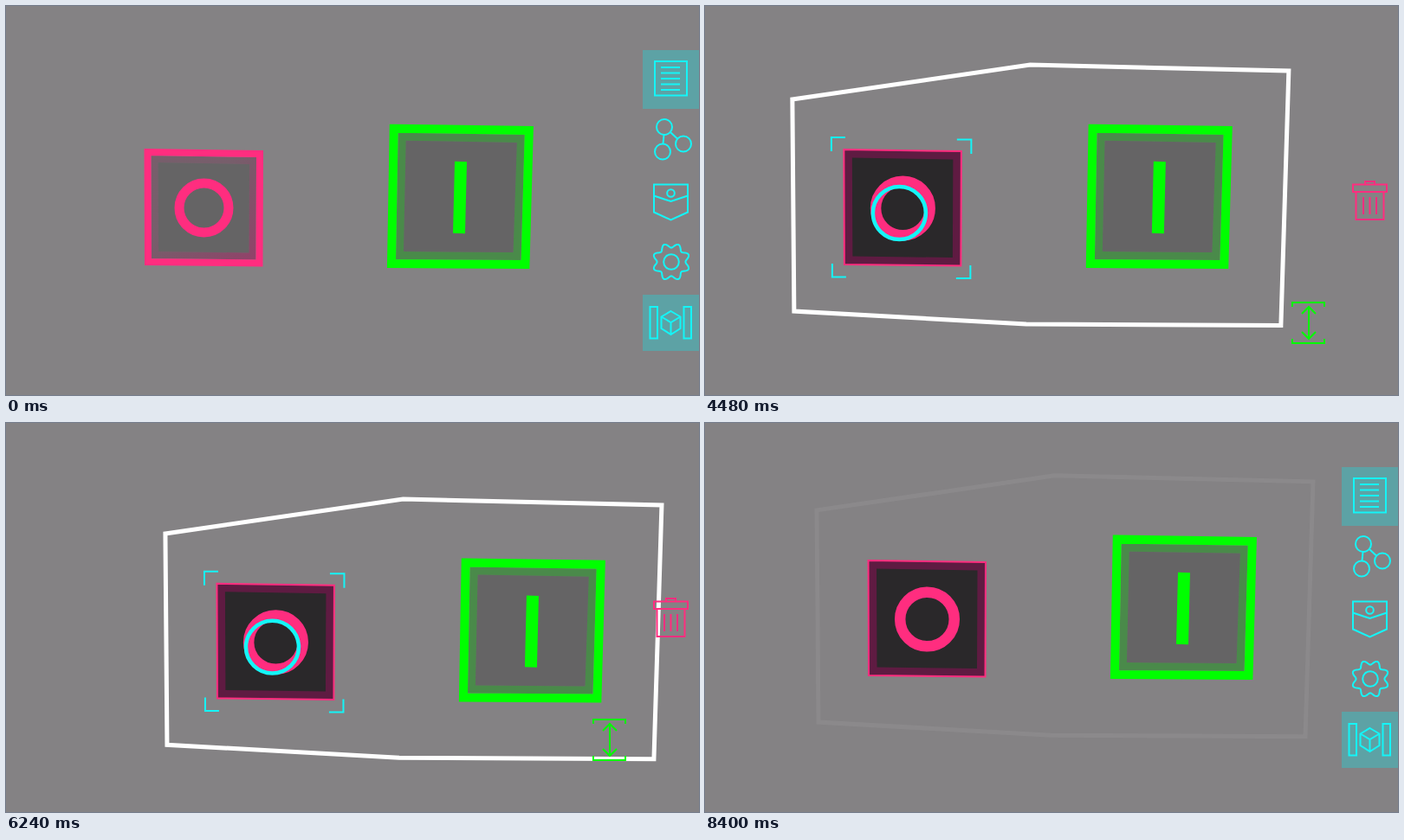
These frames come from a looping animation (800 px wide and 450 px high, 8.56 s). An HTML page:

```html
<!DOCTYPE html>
<html lang="en">
<head>
<meta charset="utf-8">
<title>Lasso and drag</title>
<style>
  html, body { margin: 0; width: 100%; height: 100%; overflow: hidden; background: #848284; }
  svg { display: block; width: 800px; height: 450px; }
  path, circle { fill: none; }
  .line { stroke-width: 2; }
  .cyan { stroke: #14f5f7; }
  .pink { stroke: #ff2d7f; }
  .green { stroke: #00ff00; }
  .shade { fill: rgba(0, 0, 0, .235); }
</style>
</head>
<body>
<svg viewBox="0 0 800 450">
  <defs>
    <linearGradient id="rim" x1="0" y1="0" x2="1" y2="1">
      <stop offset=".4" stop-color="rgb(100,40,70)" stop-opacity=".4"/>
      <stop offset="1" stop-color="rgb(157,22,88)" stop-opacity=".6"/>
    </linearGradient>
  </defs>
  <rect width="800" height="450" fill="#848284"/>

  <g id="lasso">
    <path id="area" style="fill: rgba(0, 255, 255, .2)"/>
    <path id="dashes" class="green" stroke-width="5" stroke-dasharray="9 5"/>
  </g>

  <g id="group">
    <g id="idle">
      <circle class="pink" cx="228.5" cy="233.5" r="28.5" stroke-width="11"/>
    </g>
    <g id="selected">
      <circle class="pink" cx="228.5" cy="234" r="31.3" stroke-width="12.5"/>
    </g>
    <g id="start">
      <path class="green" d="M525 180L523 263" stroke-width="14"/>
    </g>
    <path id="outline" d="M101 108L375.5 68L674 75L665 369.5L371 368L103 353Z" stroke="#fff" stroke-width="5"/>
    <g id="handles">
      <path class="line cyan" d="M146 168v-16h16M291 154.500h16.500v16.500M147 298v15.500h16M290 315h16.500v-15"/>
      <circle class="cyan" cx="224.5" cy="239.5" r="30.5" stroke-width="4.5"/>
    </g>
  </g>

  <g id="menu">
    <path d="M735 51h65v68h-65zM735 334h65v65h-65z" style="fill: #5da2a5"/>
    <g class="line cyan">
      <path d="M749 64h37v39.500h-37z"/>
      <path id="rows"/>
      <circle cx="760" cy="140" r="9"/>
      <circle cx="758" cy="168.5" r="9"/>
      <circle cx="782" cy="159.5" r="9"/>
      <path d="M759.500 149l-1 10.500M767 146l8 7.500"/>
      <path d="M748 206.500h39v32l-19.500 9l-19.500 -9zM748 219.500l19.500 6.500l19.500 -6.500"/>
      <circle cx="767.5" cy="216.500" r="4.300"/>
      <path id="gear"/>
      <circle cx="768" cy="296" r="8.8"/>
      <path d="M743.500 348h8.500v36.500h-8.500zM782.500 348h8.500v36.500h-8.500z"/>
      <path d="M767.500 353l11 6.500v13.500l-11 7l-11 -7v-13.500zM756.500 359.500l11 6.500l11 -6.500M767.500 366v14"/>
    </g>
  </g>

  <g id="tools">
    <path class="line pink" d="M748 206.500h39v8.500h-39zM762 206v-3h11v3M751.500 215v32h32v-32M760 221v20M767.500 221v20M775 221v20"/>
    <path class="line green" d="M678 348v-5h37v5M678 385v5h37v-5M697 348v37M689 356l8 -8l8 8M689 377l8 8l8 -8"/>
  </g>

  <circle id="cursor" class="cyan" r="30.5" stroke-width="4"/>
</svg>

<script>
const LOOP = 8560, STEP = 80;
const $ = id => document.getElementById(id);
const show = (id, on) => $(id).style.display = on ? "" : "none";
const clamp = v => Math.max(0, Math.min(1, v));
const toPath = points => "M" + points.map(p => p.map(v => v.toFixed(1)).join(" ")).join("L");

// Catmull-Rom interpolation between b and c
const spline = (a, b, c, d, u) =>
  b + .5 * u * (c - a + u * (2 * a - 5 * b + 4 * c - d + u * (3 * (b - c) + d - a)));

// Square buttons: outer corners, and shapes set in from them
const stopButton = [[159.5, 165], [297, 167], [296.5, 301.5], [160, 300]];
const startButton = [[442.7, 136.7], [608.8, 138.9], [604.5, 304], [440, 303]];

function inset(quad, d) {
  const middle = axis => quad.reduce((sum, p) => sum + p[axis], 0) / 4;
  return toPath(quad.map(p => p.map((v, axis) => v + d * Math.sign(middle(axis) - v)))) + "Z";
}

function addPath(parent, d, attributes) {
  const path = document.createElementNS("http://www.w3.org/2000/svg", "path");
  path.setAttribute("d", d);
  for (const [name, value] of Object.entries(attributes)) path.setAttribute(name, value);
  $(parent).prepend(path);
}

function addButton(parent, quad, color, border, rim, rimFill) {
  const inner = inset(quad, rim);
  addPath(parent, inset(quad, border / 2), { class: color, "stroke-width": border });
  addPath(parent, inner, { class: "shade" });
  addPath(parent, inset(quad, border) + inner, { style: `fill: ${rimFill}`, "fill-rule": "evenodd" });
}

addButton("idle", stopButton, "pink", 8, 16, "url(#rim)");
addButton("start", startButton, "green", 10, 19, "rgba(0, 148, 0, .44)");
addPath("selected", inset(stopButton, 10.5), { style: "fill: #2a282a" });
addPath("selected", inset(stopButton, 1), { class: "line pink", style: "fill: #5f1b42" });

// Icon details
$("rows").setAttribute("d", [0, 1, 2, 3, 4].map(i => `M756 ${71 + 6.5 * i}h22`).join(""));
$("gear").setAttribute("d", toPath(Array.from({ length: 96 }, (_, i) => {
  const a = i / 96 * 2 * Math.PI, r = 19 - 2.6 * Math.cos(8 * a);
  return [768 + r * Math.cos(a), 296 + r * Math.sin(a)];
})) + "Z");

// Closed lasso curve, sampled with its running length
const knots = [
  [670, 257], [640, 345], [545, 390], [315, 405], [190, 358],
  [112, 270], [105, 185], [161, 123], [350, 72], [570, 110]
];
const PAUSE_KNOT = 7, SUB = 24;
const samples = [];
for (let k = 0; k <= knots.length * SUB; k++) {
  const i = Math.floor(k / SUB), u = k % SUB / SUB;
  const near = [-1, 0, 1, 2].map(n => knots[(i + n + knots.length) % knots.length]);
  const point = [0, 1].map(axis => spline(...near.map(p => p[axis]), u));
  const last = samples[k - 1];
  const len = last ? last.len + Math.hypot(point[0] - last.point[0], point[1] - last.point[1]) : 0;
  samples.push({ point, len });
}
const pauseLength = samples[PAUSE_KNOT * SUB].len;
const fullLength = samples[samples.length - 1].len;

function lassoLength(t) {
  if (t <= 1200) return pauseLength * clamp((t - 240) / 960) ** 1.3;
  return pauseLength + (fullLength - pauseLength) * clamp((t - 1200) / 480);
}

function drawLasso(t) {
  const on = t >= 240 && t < 1760;
  show("lasso", on);
  show("cursor", on);
  if (!on) return;
  const length = lassoLength(t);
  const trail = samples.filter(s => s.len <= length + .01).map(s => s.point);
  const [x, y] = trail[trail.length - 1];
  const d = toPath(trail);
  $("area").setAttribute("d", d + "Z");
  $("dashes").setAttribute("d", d);
  $("cursor").setAttribute("cx", x);
  $("cursor").setAttribute("cy", y);
}

// The drag circles its resting place: time, radius, degrees left of upright
const REST = [28, -7];
const swirl = [[4480, 29, 104], [5120, 85, 381], [5840, 80, 782], [6640, 38, 1141], [7600, 0, 1500]];

function dragOffset(t) {
  if (t < swirl[0][0]) return [0, 0];
  const next = swirl.findIndex(key => key[0] > t);
  if (next < 0) return REST;
  const near = [-2, -1, 0, 1].map(n => swirl[Math.max(0, Math.min(swirl.length - 1, next + n))]);
  const u = (t - near[1][0]) / (near[2][0] - near[1][0]);
  const [radius, degrees] = [1, 2].map(part => spline(...near.map(key => key[part]), u));
  const a = degrees * Math.PI / 180;
  return [REST[0] - radius * Math.sin(a), REST[1] - radius * Math.cos(a)];
}

// Slightly taller towards the top of the view
function placeGroup([dx, dy]) {
  const stretch = 1 - dy * .00013;
  $("group").setAttribute("transform", `translate(${dx} ${220 + dy}) scale(1 ${stretch}) translate(0 -220)`);
}

function outlineOpacity(t) {
  if (t < 1760) return 0;
  return t < 4480 ? clamp(1 - (t - 2160) / 560) : clamp(1 - (t - 7920) / 510);
}

function render(ms) {
  const t = Math.floor(ms % LOOP / STEP) * STEP;
  const dragging = t >= 4480 && t < 7680;
  const selected = t >= 3760;
  drawLasso(t);
  show("idle", !selected);
  show("selected", selected);
  show("handles", dragging);
  show("tools", dragging);
  show("menu", !dragging);
  $("outline").setAttribute("opacity", outlineOpacity(t));
  placeGroup(dragOffset(t));
}

const start = performance.now();
function tick() {
  render(performance.now() - start);
  requestAnimationFrame(tick);
}
tick();
</script>
</body>
</html>
```
